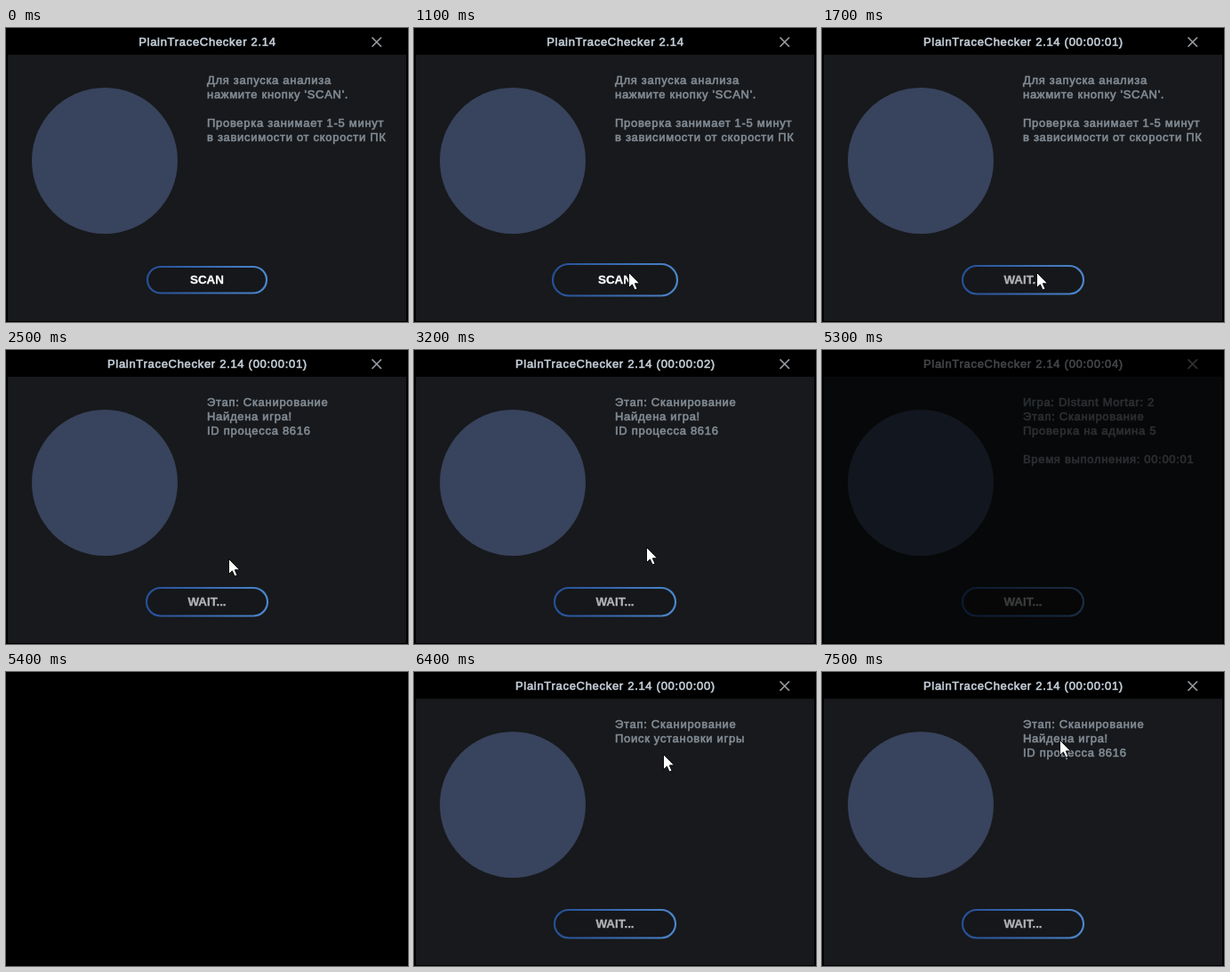
An HTML page for the animation above (8 s loop, 452 px wide and 330 px high).

```html
<!DOCTYPE html>
<html lang="ru">
<head>
<meta charset="utf-8">
<style>
  html, body { margin: 0; width: 100%; height: 100%; overflow: hidden; background: #000; }
  svg { display: block; width: 452px; height: 330px; }
  text { font: 13px "Liberation Sans", Arial, sans-serif; }
  .ui { letter-spacing: .7px; stroke-width: .6px; }
  #title { fill: #c6d0da; stroke: #c6d0da; text-anchor: middle; }
  .line { fill: #828b94; stroke: #828b94; }
  #label { font-size: 13.4px; font-weight: bold; text-anchor: middle; stroke-width: .3px; }
</style>
</head>
<body>
<svg viewBox="0 0 452 330">
  <defs>
    <linearGradient id="rim">
      <stop offset="0" stop-color="#264f96"/>
      <stop offset="1" stop-color="#4c86cb"/>
    </linearGradient>
  </defs>
  <rect width="452" height="330"/>
  <g id="window">
    <rect x="2" y="30" width="448" height="299" fill="#17191c"/>
    <text id="title" class="ui" x="226.4" y="20"></text>
    <path d="M411.5 10.5l10.5 10.5m0-10.5l-10.5 10.5" stroke="#979ca1" stroke-width="1.7"/>
    <circle cx="111" cy="149" r="82" fill="#38435d"/>
    <g id="lines"></g>
    <rect id="button" fill="#15171a" stroke="url(#rim)" stroke-width="2.2"/>
    <text id="label" x="226" y="287"></text>
    <path id="cursor" d="M-.5-.5v17l3.9-3.6 2.7 6.1 2.9-1.2-2.7-6h5.3z" fill="#fff" stroke="#000" stroke-width=".9"/>
  </g>
</svg>
<script>
const LOOP = 8000, STEP = 100;
const el = id => document.getElementById(id);
const APP = 'PlainTraceChecker 2.14';
const intro = ['Для запуска анализа', "нажмите кнопку 'SCAN'.", '',
  'Проверка занимает 1-5 минут', 'в зависимости от скорости ПК'];
const search = ['Этап: Сканирование', 'Поиск установки игры'];
const found = ['Этап: Сканирование', 'Найдена игра!', 'ID процесса 8616'];
const check = s => ['Игра: Distant Mortar: 2', 'Этап: Сканирование', 'Проверка на админа 5', '',
  'Время выполнения: 00:00:0' + s];

// [start time, value]
const messages = [[0, intro], [1900, search], [2300, found], [3600, check(0)], [4800, check(1)],
  [6400, search], [7000, found]];
const seconds = [[0, null], [1500, 0], [1700, 1], [2700, 2], [3700, 3], [4800, 4], [6400, 0], [7000, 1]];
const growth = [[0, 0], [1100, 3], [1500, 1]];

// Pointer paths: [time, x, y]; the pointer is hidden outside them.
const paths = [
  { end: 3900, keys: [[1100, 242, 275], [1700, 242, 275], [2500, 251, 235], [3200, 262, 222], [3400, 260, 218]] },
  { end: LOOP, keys: [[6400, 281, 93], [7200, 272, 74], [7300, 269, 72], [7400, 265, 74], [7500, 268, 77]] }
];

const at = (track, t) => track.findLast(([start]) => start <= t)[1];

function pointer(t) {
  const path = paths.find(p => t >= p.keys[0][0] && t < p.end);
  if (!path) return null;
  const i = path.keys.findLastIndex(k => k[0] <= t);
  const a = path.keys[i], b = path.keys[i + 1] || a;
  const f = a === b ? 0 : (t - a[0]) / (b[0] - a[0]);
  return [1, 2].map(n => Math.round(a[n] + (b[n] - a[n]) * f));
}

function drawLines(lines) {
  el('lines').innerHTML = lines.map((s, i) =>
    `<text class="line ui" x="226" y="${63 + 16 * i}">${s}</text>`).join('');
}

function drawButton(grow, waiting) {
  const box = { x: 159 - grow, y: 268 - grow, width: 134 + 2 * grow, height: 29.5 + 2 * grow, rx: 15 + grow };
  const ink = waiting ? '#b2b4b7' : '#fff';
  for (const key in box) el('button').setAttribute(key, box[key]);
  el('label').textContent = waiting ? 'WAIT...' : 'SCAN';
  el('label').setAttribute('fill', ink);
  el('label').setAttribute('stroke', ink);
}

function draw(t) {
  const sec = at(seconds, t), pos = pointer(t);
  el('title').textContent = sec === null ? APP : `${APP} (00:00:0${sec})`;
  drawLines(at(messages, t));
  drawButton(at(growth, t), sec !== null);
  el('cursor').style.display = pos ? '' : 'none';
  if (pos) el('cursor').setAttribute('transform', `translate(${pos})`);
  el('window').style.opacity = t >= 6400 ? 1 : Math.min(1, Math.max(0, (5400 - t) / 300));
}

let last = -1;
function tick() {
  const t = Math.floor(performance.now() % LOOP / STEP) * STEP;
  if (t !== last) draw(last = t);
  requestAnimationFrame(tick);
}
tick();
</script>
</body>
</html>
```
